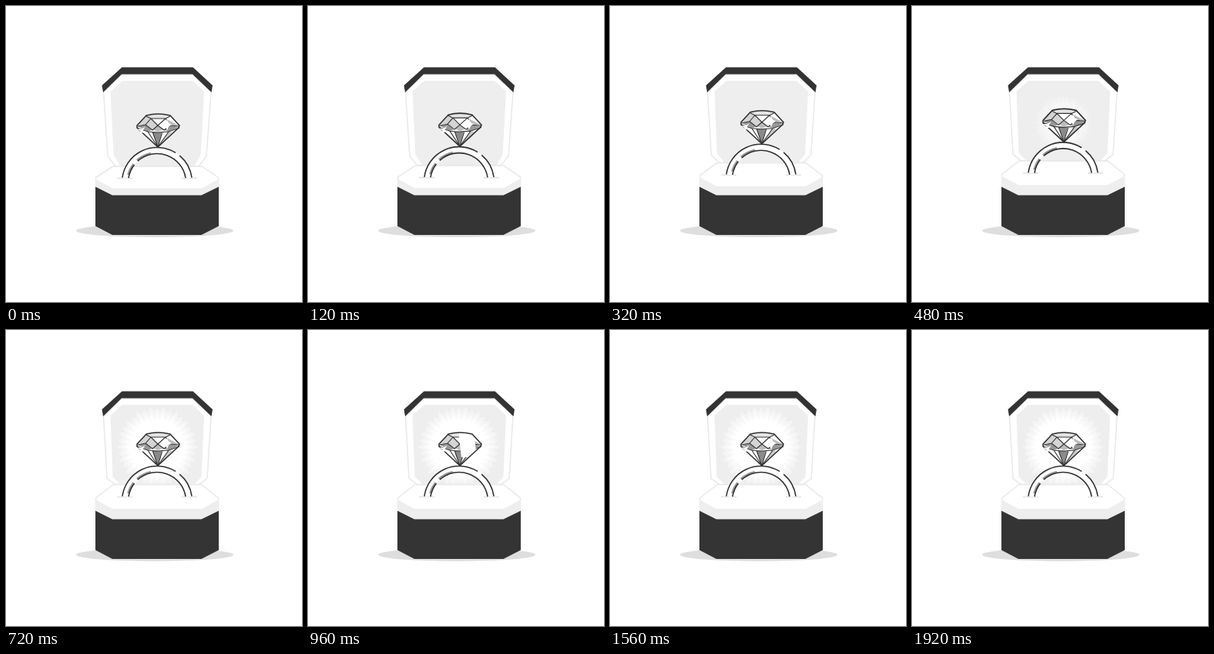
An HTML page for the animation above (2.4 s loop, 384 by 384 pixels).

```html
<!DOCTYPE html>
<html lang="en">
<head>
<meta charset="utf-8">
<title>Ring box</title>
<style>
  html, body { margin: 0; width: 100%; height: 100%; overflow: hidden; background: #fff; }
  svg { display: block; width: 100vw; height: 100vh; }
</style>
</head>
<body>
<svg viewBox="0 0 384 384">
  <defs>
    <clipPath id="liningClip"><path id="liningEdge"/></clipPath>
    <clipPath id="gemClip"><path d="M170 148 182 135Q197 131 213 135L225 148 224 151 197 176 170 151Z"/></clipPath>
  </defs>
  <ellipse cx="193" cy="291.5" rx="102" ry="8.5" fill="#dedede"/>
  <path id="lid" fill="#fff" stroke="#e8e8e8" stroke-width="1.5"/>
  <path d="M124.500 103 150.500 79.500H242.500L268 103 266.500 112 242 88.500H150L126 112Z" fill="#333"/>
  <path id="lining" fill="#eee"/>
  <g clip-path="url(#liningClip)"><g id="glow"></g></g>
  <path id="tray" fill="#fff" stroke="#e8e8e8" stroke-width="1.5" stroke-linejoin="round"/>
  <path id="band" fill="#eee"/>
  <path d="M116 234.500 138 245.500H253.500L276 234.500V285.500L253.500 297H138L116 285.500Z" fill="#343434"/>

  <g id="jewel" fill="none" stroke="#303030" stroke-width="1.6" stroke-linejoin="round">
    <path d="M144 216.500H164M228 216.500H248" stroke="#e2e2e2"/>
    <path id="ringFill" stroke="#fff" stroke-width="8"/>
    <path id="ringShade" stroke="#999" stroke-width="2.500"/>
    <path id="ringLines"/>

    <path d="M170 148 182 135Q197 131 213 135L225 148 224 151 197 176 170 151Z" fill="#fff" stroke="none"/>
    <g stroke="none">
      <path d="M182 135.500Q197 131.500 213 135.500L207 139H188Z" fill="#e4e4e4"/>
      <path d="M182 136 188 139 181 147 171 148ZM188 139 181 147 190 153 197 148Z" fill="#d4d4d4"/>
      <path d="M171 149 181 147 189 154 184 156ZM205 154 213 148 224 150 211 156Z" fill="#989898"/>
      <path d="M197 148 190 153 197 156 205 153ZM207 139 213 148 224 148Z" fill="#bcbcbc"/>
      <path d="M190 157 202 157 197 175Z" fill="#8a8a8a"/>
      <path d="M211 156 216 157 197 176Z" fill="#c8c8c8"/>
    </g>
    <path stroke="#363636" stroke-width="1.1" d="M182 136 188 139H207L213 136M188 139 181 147 171 149M188 139 197 148 207 139 213 148 224 149M181 147 190 154 197 148 205 154 213 148M170 151 184 156 197 157 211 156 225 151M184 156 197 176 211 156M190 156 197 176 203 156"/>
    <g clip-path="url(#gemClip)"><path id="shine" d="M-12 130H8L12 165H-8Z" fill="#fff" stroke="none"/></g>
    <path d="M170 148 182 135Q197 131 213 135L225 148 224 151 197 176 170 151Z"/>
    <g fill="#fff" stroke="none">
      <path id="star" d="M0 -8Q1 -2 6 0 1 2 0 8 -1 2 -6 0 -1 -2 0 -8Z"/>
      <path id="spark" d="M-6 -2 -1 -2 4 -5 1 0 5 3 0 3 -3 5 -2 1Z"/>
    </g>
  </g>
</svg>
<script>
const LOOP = 2400, STEP = 40;
const el = id => document.getElementById(id);
const setPath = (id, d) => el(id).setAttribute('d', d);
const move = (id, x, y, scale = 1) =>
  el(id).setAttribute('transform', `translate(${x} ${y}) scale(${scale})`);
const clamp = v => Math.min(1, Math.max(0, v));
const span = (t, from, to) => clamp((t - from) / (to - from));
const smooth = p => p * p * (3 - 2 * p);

// Arc around the ring centre; angles in degrees, counter-clockwise from the right.
function arc(r, from, to) {
  const point = a => {
    const rad = a * Math.PI / 180;
    return `${196 + r * Math.cos(rad)} ${222 - r * Math.sin(rad)}`;
  };
  return `M${point(from)}A${r} ${r} 0 0 0 ${point(to)}`;
}

function burst(radius, spikes) {
  return 'M' + Array.from({ length: spikes * 2 }, (_, i) => {
    const a = i * Math.PI / spikes;
    const r = radius - (i % 2 ? 7 : i % 4);
    return `${(r * Math.cos(a)).toFixed(1)} ${(r * Math.sin(a)).toFixed(1)}`;
  }).join('L') + 'Z';
}

[[53, '#f5f5f5'], [47, '#fafafa'], [42, '#fff']].forEach(([r, fill]) => {
  const ray = document.createElementNS('http://www.w3.org/2000/svg', 'path');
  ray.setAttribute('d', burst(r, 36));
  ray.setAttribute('fill', fill);
  el('glow').append(ray);
});

setPath('ringFill', arc(41.5, 8, 172));
setPath('ringShade', arc(39, 102, 132) + arc(39, 142, 165));
setPath('ringLines', arc(45.5, 8, 50) + arc(45.5, 58, 172) + arc(37.5, 9, 132) + arc(37.5, 142, 171));

function render(t) {
  const rise = smooth(span(t, 0, 560));
  const back = 208 - 7.5 * rise, side = 222.5 - 4.5 * rise, front = 236.5 - 4.5 * rise;
  const low = 195 - 2.5 * rise;

  setPath('lid', `M126.5 111 150 89H242L266 111 ${260 + rise} ${low} 250 ${back}H142L${132 - rise} ${low}Z`);
  const lining = `M135.5 111 151 97H242L257 111 ${252.5 + rise} ${low - 2} 245 ${back - 1}H148L${139.5 - rise} ${low - 2}Z`;
  setPath('lining', lining);
  setPath('liningEdge', lining);
  setPath('tray', `M116.500 ${side} 139 ${back}H254L275.500 ${side}V235L253 246H138L116.500 235Z`);
  setPath('band', `M116 ${side + 2} 138 ${front}H254L276 ${side + 2}V235L253 246H138L116 235Z`);
  move('jewel', 0, 7 * (1 - rise));

  const light = span(t, 400, 560);
  move('glow', 196, 152, 0.4 + 0.6 * light);
  el('glow').setAttribute('opacity', light);

  const sweep = span(t, 720, 1240);
  move('shine', 158 + 106 * sweep, 0);
  el('shine').style.display = sweep > 0 && sweep < 1 ? '' : 'none';

  move('star', 209, 147, 1 + 0.12 * Math.sin(Math.PI * span(t, 1280, 1800)));
  move('spark', 176.5, 154.5, 1 - 0.25 * Math.sin(Math.PI * span(t, 1800, 1920)));
}

function frame(now) {
  render(Math.floor(now % LOOP / STEP) * STEP);
  requestAnimationFrame(frame);
}
render(0);
requestAnimationFrame(frame);
</script>
</body>
</html>
```
